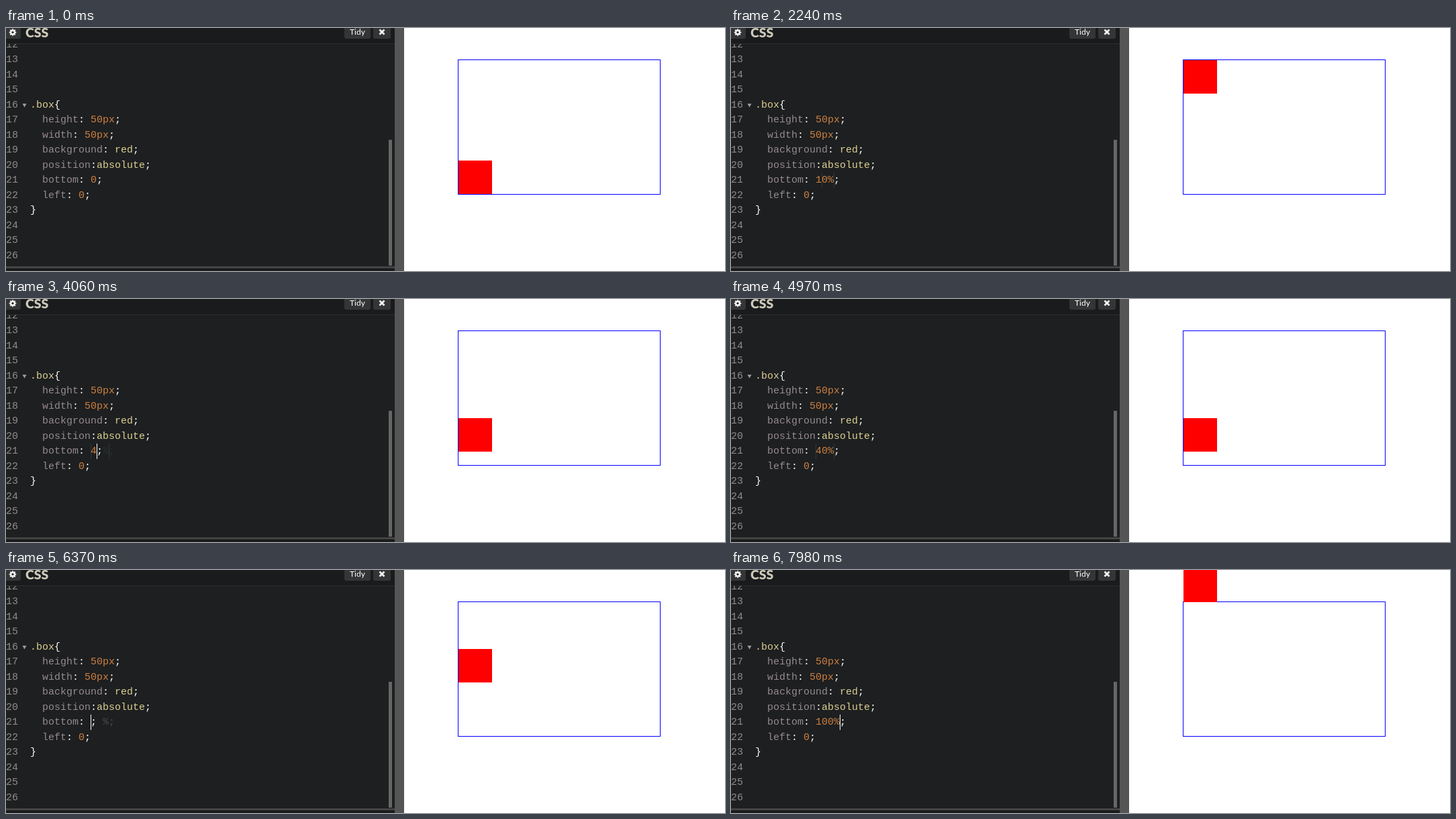
Write an HTML page that moves like this. It is 1071 px wide and 363 px high and loops after 8 s.

```html
<!DOCTYPE html>
<html lang="en">
<head>
<meta charset="utf-8">
<style>
html, body { margin: 0; width: 100%; height: 100%; overflow: hidden; background: #fff; }
#stage { position: relative; width: 1071px; height: 363px; overflow: hidden; }
#stage > * { position: absolute; margin: 0; }
#editor { left: 0; top: 0; width: 579px; height: 363px; background: #1d1f20; }
#code, #ghost { font: 15px/22.5px "Liberation Mono", monospace; white-space: pre; }
#code { left: 0; top: 14.5px; color: #fff; }
#ghost { left: 144px; top: 217px; }
.n { color: #918d8a; }
.p { color: #968a90; }
.v { color: #cd8041; }
.k { color: #ddcf92; }
.caret { top: 216px; width: 1px; height: 22.5px; background: #fff; }
.dim { background: #33383a; }
#frame { left: 673px; top: 47px; width: 300px; height: 200px; border: 1px solid #00f; }
#box { left: 674px; width: 50px; height: 50px; background: #f00; }
svg { left: 0; top: 0; font-family: Lato, sans-serif; }
</style>
</head>
<body>
<div id="stage">
  <div id="editor"></div>
  <div id="ghost">%;</div>
  <pre id="code"></pre>
  <div class="caret dim"></div>
  <div class="caret dim"></div>
  <div class="caret" id="caret"></div>
  <svg width="1071" height="363">
    <rect width="579" height="23" fill="#1a1b1c"/>
    <rect y="23" width="579" height="1" fill="#2b2d2e"/>
    <path d="M0 0H22V13Q22 16 19 16H0ZM504 0H543V13Q543 16 540 16H507Q504 16 504 13ZM547 0H573V13Q573 16 570 16H550Q547 16 547 13Z" fill="#343536"/>
    <g fill="none" stroke="#fff">
      <circle cx="10" cy="6.5" r="2.9" stroke-width="2.2"/>
      <circle cx="10" cy="6.5" r="4.4" stroke-width="1.8" pathLength="16" stroke-dasharray="1" stroke-dashoffset=".5"/>
      <path d="M556.5 2.5L563.5 9.5M563.5 2.5L556.5 9.5" stroke-width="2.6"/>
    </g>
    <text x="29" y="14" font-size="19.5" font-weight="900" fill="#ccc9b9">CSS</text>
    <text x="512" y="10" font-size="12" fill="#fff">Tidy</text>
    <path d="M24.5 113H30.5L27.5 118.5Z" fill="#9a9a9a"/>
    <rect x="570" y="167" width="5" height="188" fill="#666"/>
    <rect y="356" width="579" height="3" fill="#444"/>
    <rect y="359" width="579" height="4" fill="#1a1b1c"/>
    <rect x="579" width="14" height="363" fill="#555"/>
  </svg>
  <div id="frame"></div>
  <div id="box"></div>
</div>
<script>
const $ = id => document.getElementById(id);
const LOOP = 8000, DIM = ['#2b3032', '#484b4c'];

// time, typed value, caret shown, faded carets (columns), faded text shade
const typing = [
  [0, '0', 0], [420, '0', 1], [770, '', 1], [1260, '1', 1],
  [1400, '10', 1, [1]], [1750, '10%', 1, [1]], [2240, '10%', 0, [1, 3]],
  [2730, '10%', 1, [1]], [3010, '10', 1], [3150, '1', 1], [3290, '', 1, [], 0],
  [3780, '', 0, [0, 3], 0], [4060, '4', 1, [0, 3], 0], [4130, '40', 1, [0]],
  [4480, '40%', 1, [0]], [4970, '40%', 0, [0, 3]], [5460, '40%', 1, [0]],
  [5950, '40%', 0, [0, 3]], [6090, '40', 1], [6230, '4', 1], [6370, '', 1, [], 1],
  [6510, '1', 1, [], 1], [6650, '10', 1], [6790, '100', 1],
  [7000, '100%', 1], [7490, '100%', 0], [7980, '100%', 1]
];
// time, bottom offset in percent
const moves = [[0, 0], [1190, 75], [2590, 10], [5320, 40], [7840, 100]];

const span = (cls, text) => `<span class="${cls}">${text}</span>`;
const rule = (name, value, cls = 'v', gap = ' ') =>
  '  ' + span('p', name) + ':' + gap + span(cls, value) + ';';
const lines = ['', '', '', '',
  span('k', '.box') + '{',
  rule('height', '50px'), rule('width', '50px'),
  rule('background', 'red', 'k'), rule('position', 'absolute', 'k', ''),
  rule('bottom', '0').replace('class="v"', 'class="v" id="value"'),
  rule('left', '0'), '}', '', '', ''];
$('code').innerHTML = lines.map((s, i) => span('n', 12 + i) + '  ' + s).join('\n');

const faded = document.querySelectorAll('.dim');
const at = (list, t) => list.findLast(s => s[0] <= t);
const place = (el, col, on) => {
  el.style.left = 126 + 9 * col + 'px';
  el.style.display = on ? '' : 'none';
};

function draw(now) {
  const t = now % LOOP;
  const [, value, blink, cols = [], shade] = at(typing, t);
  $('value').textContent = value;
  place($('caret'), value.length, blink);
  faded.forEach((el, i) => place(el, cols[i] ?? 0, i < cols.length));
  $('ghost').style.color = DIM[shade] || 'transparent';
  $('box').style.top = 198 - 2 * at(moves, t)[1] + 'px';
}

const start = performance.now();
function tick() {
  draw(performance.now() - start);
  requestAnimationFrame(tick);
}
tick();
</script>
</body>
</html>
```
